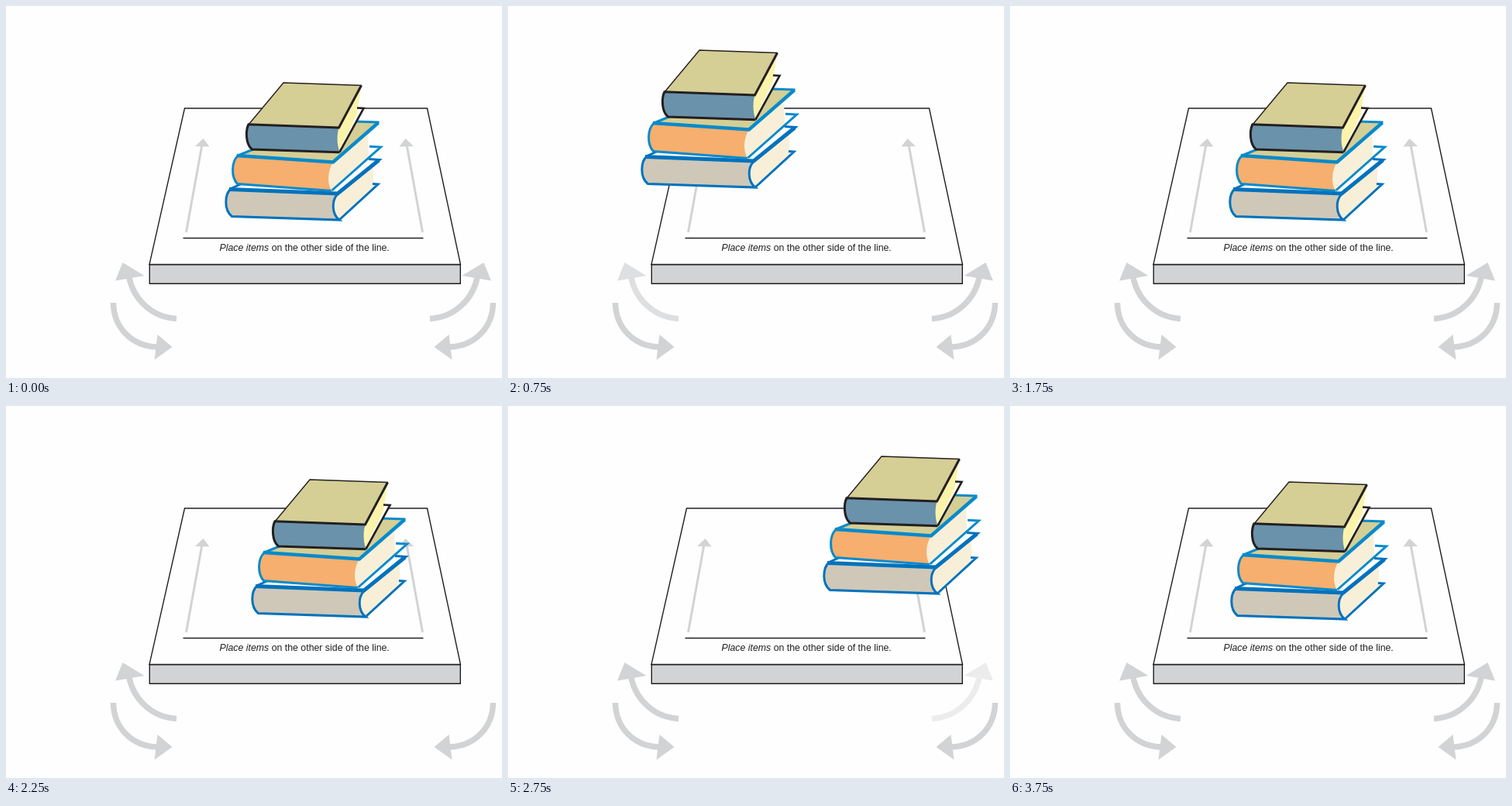
An HTML page for the animation above (4250 ms loop, 640 by 480 pixels).

```html
<!DOCTYPE html>
<html lang="en">
<head>
<meta charset="utf-8">
<title>Place items behind the line</title>
<style>
  html, body { margin: 0; width: 100%; height: 100%; overflow: hidden; background: #fefefe; }
  svg { display: block; width: 640px; height: 480px; }
  text { font: 12.33px "Liberation Sans", Arial, sans-serif; fill: #231f20; }
  .ink { stroke: #231f20; stroke-width: 1.4; }
  .curve { fill: none; stroke: #d1d3d4; stroke-width: 7.5; }
  .grey { fill: #d1d3d4; }
  .black { stroke: #231f20; }
  .sky { stroke: #078acb; }
  .blue { stroke: #0072bc; }
  .line { fill: none; stroke-width: 3; }
  .thin { fill: none; stroke-width: 1.4; }
</style>
</head>
<body>
<svg viewBox="0 0 640 480">
  <defs>
    <g id="guide">
      <path d="M232.5 292 L252.8 180" fill="none" stroke="#d1d3d4" stroke-width="3"/>
      <path class="grey" d="M254.5 171 L262.5 181.5 L244 181 Z"/>
    </g>
    <g id="up">
      <path class="curve" d="M220 403.5 C189 402 164 379 158.5 348"/>
      <path class="grey" d="M150.5 331 L178.5 348 L141 354.5 Z"/>
    </g>
    <g id="down">
      <path class="curve" d="M138.5 383 C139 415 162 438.5 194 440"/>
      <path class="grey" d="M214.5 440 L195.5 424 L191.5 456.5 Z"/>
    </g>
  </defs>

  <path class="ink" fill="#fefefe" d="M230.5 132 H543.5 L586.5 333.5 H185 Z"/>
  <path class="ink grey" d="M185.3 333.8 H586.3 V358.3 H185.3 Z"/>
  <path class="ink" d="M228.5 299.5 H538.5"/>
  <text x="275.5" y="316"><tspan font-style="italic">Place items</tspan> on the other side of the line.</text>

  <use href="#guide"/>
  <use href="#guide" transform="matrix(-1 0 0 1 770 0)"/>
  <use id="upL" href="#up"/>
  <use id="downL" href="#down"/>
  <use id="upR" href="#up" transform="matrix(-1 0 0 1 767 0)"/>
  <use id="downR" href="#down" transform="matrix(-1 0 0 1 767 0)"/>

  <g id="books" stroke-linejoin="miter">
    <!-- bottom book -->
    <path fill="#fefefe" d="M289 236 L305 229 L482 198 L474 229 L481 230 L430 276 L420 240 Z"/>
    <path fill="#f8efd8" d="M428 243 L474 205 V235 L430 276 C421 266 421 252 428 243 Z"/>
    <path class="blue line" d="M473 229.5 L480 230 L430 276"/>
    <path fill="#cfc8b8" d="M290 236.5 C282 243 281 263 291.5 271.5 L430 276 C420 268 420 251 428 242.5 Z"/>
    <path class="blue line" d="M290 236 C282 243 281 263 291.5 271.5 L430 276 C420 268 420 251 428 242.5 L482 198.5 L468 197.5"/>
    <path class="blue line" stroke-width="2" d="M289 236 L305 229"/>
    <path class="blue" fill="none" style="stroke-width:5" d="M288 236.5 L428 242 L481 199"/>

    <!-- middle book -->
    <path fill="#fefefe" d="M422 202 L468 181 L484 182 L420 238 Z"/>
    <path fill="#f8efd8" d="M422 203 L467 162 L468 195 L420 238 C413 228 415 212 422 203 Z"/>
    <path class="sky line" d="M469 181.2 L483.5 182 L420.5 238"/>
    <path fill="#d5ce95" d="M299 193 L320 184 L440 149 L481 150 L422 202 Z"/>
    <path fill="#f6af6e" d="M299 194 C291 201 290 220 298.5 229.5 L420 238.5 C414 228 415 212 422 202 Z"/>
    <path class="sky line" d="M299 193.5 C291 201 290 220 298.5 229.5 L420 238.5"/>
    <path class="sky line" d="M298 193.5 L320 184.5 M450 149 L481.5 150"/>
    <path class="sky" fill="none" style="stroke-width:4.4" d="M298 193 L422 201.5 L480.5 150.5"/>

    <!-- top book -->
    <path fill="#fefefe" d="M430 157 L453 131.5 L462 132 L431 188.5 Z"/>
    <path fill="#fbf3aa" d="M429.5 157 L458 104 L453 139 L430 186 C426 178 426 165 429.5 157 Z"/>
    <path class="black line" style="stroke-width:2.6" d="M453 131.5 L461.5 132 L430.5 188.5"/>
    <path fill="#6a92ab" d="M313 153 C309 161 309 178 317 185 L430.5 188.7 C426.5 178 427 165 429.5 157 Z"/>
    <path class="black line" d="M313 152.5 C309 161 309 178 317.5 185 L430.5 188.7"/>
    <path fill="#d5ce95" d="M358 99 L459 102.5 L429.5 157 L313 153 Z"/>
    <path class="black thin" d="M313 153 L358 99 L459 102.5"/>
    <path class="black line" d="M312 152.7 L429.5 157 L458.5 102.5"/>
  </g>
</svg>
<script>
const LOOP = 4250;

// rows: [time in ms, ...values]; every pose holds until the next row
function play(id, rows, style) {
  const last = rows[rows.length - 1];
  const steps = [...rows, [LOOP, ...last.slice(1)]].map(([ms, ...v]) => ({
    offset: ms / LOOP, easing: 'step-end', ...style(...v)
  }));
  document.getElementById(id).animate(steps, { duration: LOOP, iterations: Infinity });
}

const move = (x, y) => ({ transform: `translate(${x}px, ${y}px)` });
const fade = opacity => ({ opacity });

play('books', [
  [0, 0, 0], [250, -39, -7.5], [500, -75, -21], [750, -111, -42],
  [1000, -88, -27.5], [1250, -54, -13], [1500, -18, -3], [1750, 0, 0],
  [2250, 34, -4], [2500, 80, -15.5], [2750, 124, -34], [3000, 124, -34.5],
  [3250, 83, -16], [3500, 38, -5.5], [3750, 2, -1]
], move);

play('upL', [[0, 1], [250, .4], [750, .7], [1000, 1]], fade);
play('downL', [[0, 1], [1000, .5], [1250, .8], [1500, .9], [1750, 1]], fade);
play('upR', [[0, 1], [2250, 0], [2500, .2], [2750, .4], [3000, 1]], fade);
play('downR', [[0, 1], [3000, .8], [3500, .9], [3750, 1]], fade);
</script>
</body>
</html>
```
